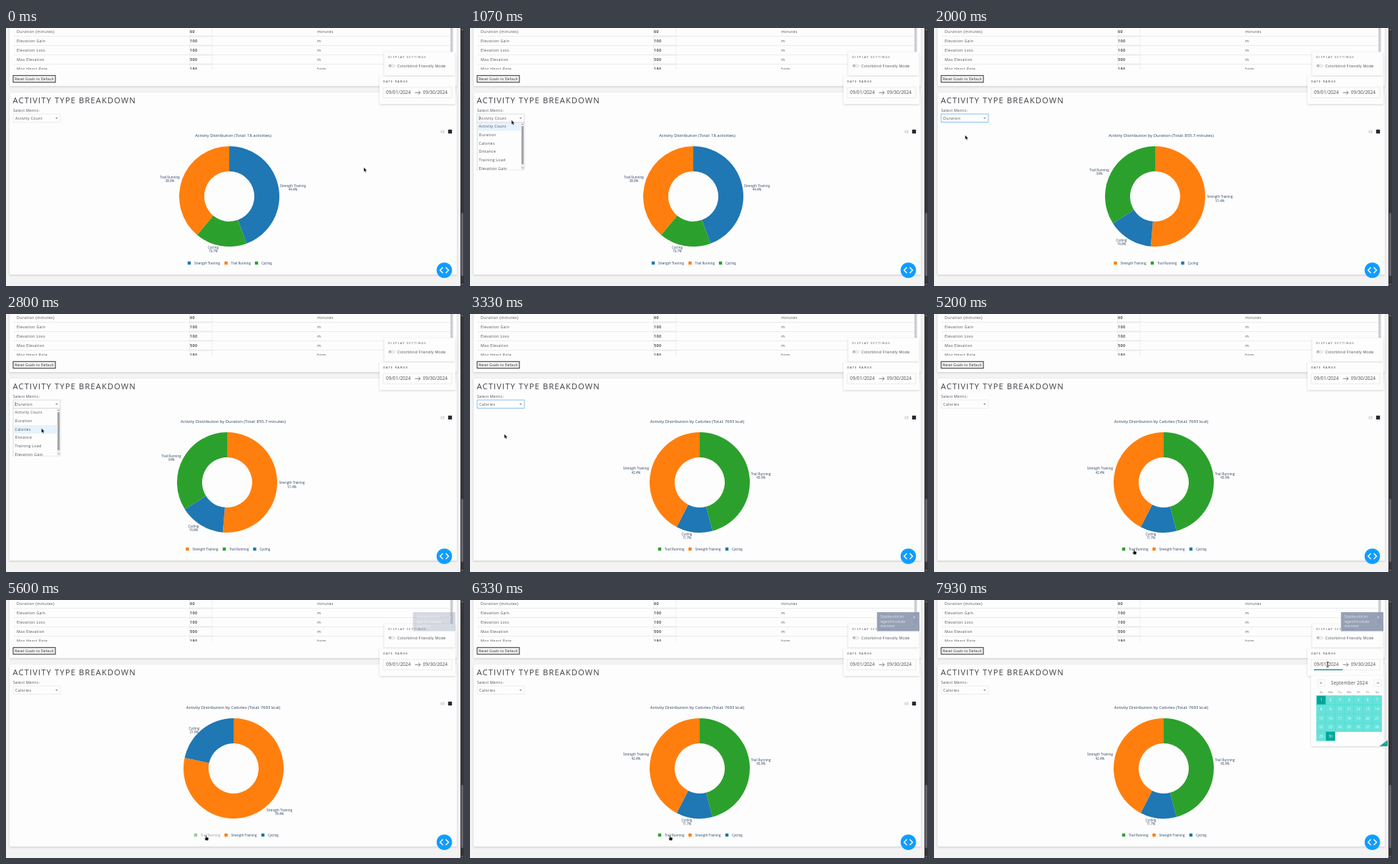
An HTML page for the animation above (8 s loop, 640 by 360 pixels).

```html
<!DOCTYPE html>
<html lang="en">
<head>
<meta charset="utf-8">
<title>Activity type breakdown</title>
<style>
html, body { margin: 0; width: 100%; height: 100%; overflow: hidden; background: #f3f3f4; }
svg { display: block; width: 100vw; height: 100vh; }
text { font-family: "Open Sans", "Noto Sans", sans-serif; white-space: pre; }
.raised { filter: drop-shadow(0 1px 1.5px rgba(0, 0, 0, .16)); }
</style>
</head>
<body>
<svg id="stage" viewBox="0 0 640 360"></svg>
<script>
const LOOP = 8000;
const INK = '#4c4c52', DARK = '#2e2e34', CHART_INK = '#2a3f5f', PANEL = '#fdfdfd', LINE = '#e6e6ea';
const BLUE = '#1f77b4', ORANGE = '#ff7f0e', GREEN = '#2ca02c', TEAL = '#00a699';
const ST = 'Strength Training', TR = 'Trail Running', CY = 'Cycling';
const stage = document.getElementById('stage');

function add(parent, tag, attrs = {}) {
  const node = document.createElementNS('http://www.w3.org/2000/svg', tag);
  for (const key in attrs) node.setAttribute(key, attrs[key]);
  parent.appendChild(node);
  return node;
}
const group = (parent = stage, attrs) => add(parent, 'g', attrs);
const rect = (parent, x, y, width, height, fill, more) =>
  add(parent, 'rect', { x, y, width, height, fill, ...more });
const path = (parent, d, stroke, more) =>
  add(parent, 'path', { d, fill: 'none', stroke, 'stroke-width': .7, ...more });

// y is the middle of the capital letters
function label(parent, x, y, words, size = 5.25, more = {}) {
  const node = add(parent, 'text', { x, y: y + size * .36, 'font-size': size, fill: INK, ...more });
  node.textContent = words;
  return node;
}
const spaced = gap => ({ 'letter-spacing': gap, 'font-weight': 500 });
const centred = { 'text-anchor': 'middle' };
const chartText = { ...centred, fill: CHART_INK };
const raised = { class: 'raised' };
const outline = stroke => ({ stroke, 'stroke-width': .7 });

function buildPage() {
  const page = group();
  rect(page, 0, 0, 640, 360, '#f3f3f4');
  rect(page, 5, -5, 625, 86, PANEL, raised);
  rect(page, 5, 90, 625, 254, PANEL, raised);

  const clip = add(add(stage, 'defs'), 'clipPath', { id: 'tableClip' });
  rect(clip, 0, 0, 640, 58);
  const table = group(page, { 'clip-path': 'url(#tableClip)' });
  [['Duration (minutes)', '60', 'minutes'], ['Elevation Gain', '100', 'm'],
   ['Elevation Loss', '100', 'm'], ['Max Elevation', '500', 'm'],
   ['Max Heart Rate', '180', 'bpm']].forEach(([name, value, unit], i) => {
    const y = 5 + 13 * i;
    path(table, `M10 ${y + 6.5}H620`, LINE);
    rect(table, 256.5, y - 6, 31.5, 12, 'none', outline(LINE));
    label(table, 15, y, name, 5.25, spaced(.38));
    label(table, 257, y, value, 5.5, { ...spaced(.3), fill: DARK, 'font-weight': 600 });
    label(table, 435, y, unit, 5.25, spaced(.38));
  });
  rect(table, 620.5, 0, 4.5, 58, '#ececee');
  rect(table, 621.2, 0, 3, 33, '#cbcbd0');

  rect(page, 10, 66.3, 59, 9.4, '#f4f4f4', { stroke: DARK, 'stroke-width': 1 });
  label(page, 12.2, 71, 'Reset Goals to Default', 5, { ...spaced(.13), fill: DARK });
  label(page, 9.5, 101.3, 'ACTIVITY TYPE BREAKDOWN', 11.2, { ...spaced(1.12), fill: '#3f3f47' });
  label(page, 10, 115.5, 'Select Metric:', 5.25, spaced(.32));

  // chart tool buttons
  rect(page, 607.5, 142.8, 5, 3.8, '#cfcfd4', { rx: .6 });
  add(page, 'circle', { cx: 610, cy: 144.7, r: 1.1, fill: PANEL });
  rect(page, 617.8, 141.8, 5.4, 5.4, '#26262c');

  // page scrollbar
  rect(page, 635, 0, 5, 360, '#35353a');
  rect(page, 636, 258, 3, 88, '#66666c', { rx: 1.2 });
  path(page, 'M636.2 3L637.5 1.5 638.8 3', '#aaaaae');
  path(page, 'M636.2 357L637.5 358.5 638.8 357', '#aaaaae');
}

function buildCards() {
  const cards = group();
  rect(cards, 528.5, 33.5, 99, 33, PANEL, raised);
  label(cards, 534, 41, 'DISPLAY SETTINGS', 4.1, spaced(1.15));
  rect(cards, 534, 50.2, 10, 5, '#ebebee', { rx: 2.5 });
  add(cards, 'circle', { cx: 536.6, cy: 52.7, r: 1.9, fill: '#bcbcc2' });
  label(cards, 547, 52.9, 'Colorblind Friendly Mode', 5.25, spaced(.24));
  rect(cards, 522, 67.5, 106, 38.5, PANEL, raised);
  label(cards, 527, 74.5, 'DATE RANGE', 4.1, { ...spaced(1.12), fill: DARK });
  rect(cards, 527, 83, 96, 14.5, 'none', outline(LINE));
  label(cards, 531, 90, '09/01/2024', 6.5);
  label(cards, 582.5, 90, '09/30/2024', 6.5);
  path(cards, 'M571.5 90.2H579M576.4 87.7L579 90.2 576.4 92.7', INK);
}

function buildCalendar() {
  const cal = group();
  path(cal, 'M531 97.4H571', '#008489', { 'stroke-width': 1.2 });
  rect(cal, 527, 106, 101.5, 98, PANEL, raised);
  label(cal, 580.5, 115.8, 'September 2024', 6.3, { ...centred, ...spaced(.22) });
  [[541, 1.5], [620, -1.5]].forEach(([x, dx]) => {
    rect(cal, x - 5, 111.3, 10, 9, 'none', { rx: 1, ...outline('#e4e7e7') });
    path(cal, `M${x + dx} 115.8H${x - dx}M${x} 114.3L${x - dx} 115.8 ${x} 117.3`, '#82888a');
  });
  ['Su', 'Mo', 'Tu', 'We', 'Th', 'Fr', 'Sa'].forEach((day, i) =>
    label(cal, 541.2 + 13 * i, 128.8, day, 4.2, { ...centred, fill: '#757575' }));
  for (let day = 1; day <= 30; day++) {
    const x = 534.6 + 13 * ((day - 1) % 7), y = 133.4 + 12.6 * Math.floor((day - 1) / 7);
    const end = day === 1 || day === 30;
    rect(cal, x, y, 13, 12.6, end ? TEAL : '#66e2da', { stroke: '#33dacd', 'stroke-width': .4 });
    label(cal, x + 6.5, y + 6.3, day, 4.8, { ...centred, fill: '#fff' });
  }
  add(cal, 'path', { d: 'M634 195.5V204H622.5Z', fill: TEAL });
  label(cal, 631, 201, '?', 4, { ...centred, fill: '#fff' });
  return cal;
}

function buildToast() {
  const toast = group();
  rect(toast, 568.7, 17, 59.3, 26.5, '#8c97af', { opacity: .9 });
  ['Double-click on', 'legend to isolate', 'one trace'].forEach((line, i) =>
    label(toast, 573.5, 23.5 + 6.6 * i, line, 4.5, { fill: '#e4e6ec' }));
  label(toast, 620.7, 23.7, '×', 6, { ...centred, fill: '#fff' });
  return toast;
}

// Slices run clockwise from the top: [name, percent, colour, label x, label y]
const CHARTS = {
  'Activity Count': { cx: 312, title: 'Activity Distribution (Total: 18 activities)',
    legendX: 256, legend: [ST, TR, CY],
    slices: [[ST, 44.4, BLUE, 401, 220], [CY, 16.7, GREEN, 289.5, 306], [TR, 38.9, ORANGE, 229, 208]] },
  Duration: { cx: 309, title: 'Activity Distribution by Duration (Total: 855.7 minutes)',
    legendX: 253.5, legend: [ST, TR, CY],
    slices: [[ST, 51.4, ORANGE, 399.5, 235.5], [CY, 14.6, BLUE, 262, 296], [TR, 34, GREEN, 231, 198]] },
  Calories: { cx: 321, title: 'Activity Distribution by Calories (Total: 7693 kcal)',
    legendX: 265, legend: [TR, ST, CY],
    slices: [[TR, 45.9, GREEN, 406.5, 223], [CY, 11.7, BLUE, 303, 307], [ST, 42.4, ORANGE, 232, 215.5]] }
};
CHARTS.Filtered = { ...CHARTS.Calories, cx: 318, hidden: TR,
  slices: [[ST, 78.4, ORANGE, 382, 293], [CY, 21.6, BLUE, 263, 179]] };

function ringSlice(cx, cy, from, to, outer = 70, inner = 35) {
  const at = (turn, r) => {
    const a = turn * 2 * Math.PI;
    return `${cx + r * Math.sin(a)} ${cy - r * Math.cos(a)}`;
  };
  const large = to - from > .5 ? 1 : 0;
  return `M${at(from, outer)}A${outer} ${outer} 0 ${large} 1 ${at(to, outer)}` +
    `L${at(to, inner)}A${inner} ${inner} 0 ${large} 0 ${at(from, inner)}Z`;
}

function buildChart({ cx, title, legendX, legend, slices, hidden }) {
  const chart = group(chartLayer);
  label(chart, 317.4, 149.8, title, 5.87, chartText);
  const colours = { [TR]: GREEN };
  let from = 0;
  for (const [name, percent, fill, x, y] of slices) {
    const to = from + percent / 100;
    add(chart, 'path', { d: ringSlice(cx, 235, from, to), fill });
    label(chart, x, y, name, 4.5, chartText);
    label(chart, x, y + 5.6, percent + '%', 4.5, chartText);
    colours[name] = fill;
    from = to;
  }
  const advance = { [ST]: 51.5, [TR]: 42.5, [CY]: 0 };
  let x = legendX;
  for (const name of legend) {
    const item = group(chart, { opacity: name === hidden ? .5 : 1 });
    rect(item, x - 2.2, 325.8, 4.4, 4.4, colours[name]);
    label(item, x + 7, 328.2, name, 4.5, { fill: CHART_INK });
    x += advance[name];
  }
  return chart;
}

function buildSelect() {
  const box = rect(stage, 10, 120, 66, 11.3, PANEL, outline(LINE));
  const value = label(stage, 13, 125.7, '', 5.25, spaced(.32));
  add(stage, 'path', { d: 'M69 125H72.6L70.8 127Z', fill: '#8a8a90' });
  return { box, value };
}

function buildMenu() {
  const clip = add(add(stage, 'defs'), 'clipPath', { id: 'menuClip' });
  rect(clip, 9, 118, 68, 80.5);
  const menu = group(stage, { 'clip-path': 'url(#menuClip)' });
  path(menu, 'M13 122.7V128.7', DARK, { 'stroke-width': .5 });
  rect(menu, 10, 131.5, 66, 66.7, PANEL, outline('#cfcfd4'));
  const mark = rect(menu, 10.4, 131.8, 61, 11.6, '#e6f2fd');
  ['Activity Count', 'Duration', 'Calories', 'Distance', 'Training Load', 'Elevation Gain']
    .forEach((name, i) => label(menu, 12.5, 137.5 + 11.7 * i, name, 5.25, spaced(.32)));
  rect(menu, 71.3, 131.8, 4.4, 66, '#ededf0');
  rect(menu, 72, 137, 3, 53, '#a5a5a9');
  path(menu, 'M72.3 135L73.5 133.8 74.7 135M72.3 194.5L73.5 195.7 74.7 194.5', '#5c5c62');
  return { menu, mark };
}

buildPage();
const chartLayer = group();
const charts = Object.fromEntries(
  Object.entries(CHARTS).map(([name, spec]) => [name, buildChart(spec)]));
const select = buildSelect();
const { menu, mark } = buildMenu();
buildCards();
const calendar = buildCalendar();
const toast = buildToast();

add(stage, 'circle', { cx: 612.5, cy: 338, r: 10.8, fill: '#119dff' });
path(stage, 'M610.5 334L606.6 338 610.5 342M614.5 334L618.4 338 614.5 342', '#fff', { 'stroke-width': 1.4 });

const pointerStyle = { fill: '#111', stroke: '#fff', 'stroke-width': .25 };
const arrow = add(stage, 'path', { d: 'M0 0V6L1.4 4.8 2.4 7.1 3.4 6.6 2.5 4.5H4.3Z', ...pointerStyle });
const hand = add(stage, 'path', {
  d: 'M-.6 .3Q0 -.5 .6 .3V2.6L3 3.1Q3.7 3.4 3.5 4.4L2.9 7H-.4L-2.2 4.2Q-1.6 3.3 -.6 4.2Z', ...pointerStyle });
const beam = path(stage, 'M-1.7 -3.2H1.7M0 -3.2V3.2M-1.7 3.2H1.7', '#111', { 'stroke-width': .8 });

// Pointer stops: [time, x, y]
const STOPS = [[70, 500, 194.5], [900, 58, 128.5], [1130, 58, 128.5], [1450, 43.5, 149.5],
  [2100, 43.5, 149.5], [2330, 56, 127], [2550, 56, 127], [2900, 48, 167.5],
  [3470, 48, 167.5], [4330, 279.5, 328.5], [6600, 279.5, 328.5], [7470, 550, 90]];

function pointerAt(t) {
  const next = STOPS.findIndex(stop => stop[0] > t);
  if (next === 0) return STOPS[0].slice(1);
  if (next < 0) return STOPS[STOPS.length - 1].slice(1);
  const [t0, x0, y0] = STOPS[next - 1], [t1, x1, y1] = STOPS[next];
  const p = (t - t0) / (t1 - t0), k = p * p * (3 - 2 * p);
  return [x0 + (x1 - x0) * k, y0 + (y1 - y0) * k];
}

const between = (t, from, to) => t >= from && t < to;
const show = (node, on) => node.setAttribute('display', on ? 'inline' : 'none');

function render(t) {
  const metric = t < 1530 ? 'Activity Count' : t < 3000 ? 'Duration' : 'Calories';
  const chart = t < 1670 ? 'Activity Count' : t < 3130 ? 'Duration'
    : between(t, 5330, 6030) ? 'Filtered' : 'Calories';
  for (const name in charts) show(charts[name], name === chart);

  const open = between(t, 970, 1530) || between(t, 2430, 3000);
  const [x, y] = pointerAt(t);
  select.value.textContent = metric;
  select.box.setAttribute('stroke', between(t, 970, 4930) ? (open ? '#cfcfd4' : '#5aa2ee') : LINE);
  show(menu, open);
  const row = y > 131.8 ? Math.floor((y - 131.8) / 11.7) : metric === 'Duration' ? 1 : 0;
  mark.setAttribute('y', 131.8 + 11.7 * Math.min(row, 2));

  toast.setAttribute('opacity', Math.max(0, Math.min(1, (t - 5330) / 700)));
  show(calendar, t >= 7670);

  const pointer = t >= 7400 ? beam : between(t, 4270, 6670) ? hand : arrow;
  for (const node of [arrow, hand, beam]) show(node, node === pointer);
  pointer.setAttribute('transform', `translate(${x} ${y})`);
}

const start = performance.now();
function tick() {
  render((performance.now() - start) % LOOP);
  requestAnimationFrame(tick);
}
tick();
</script>
</body>
</html>
```
